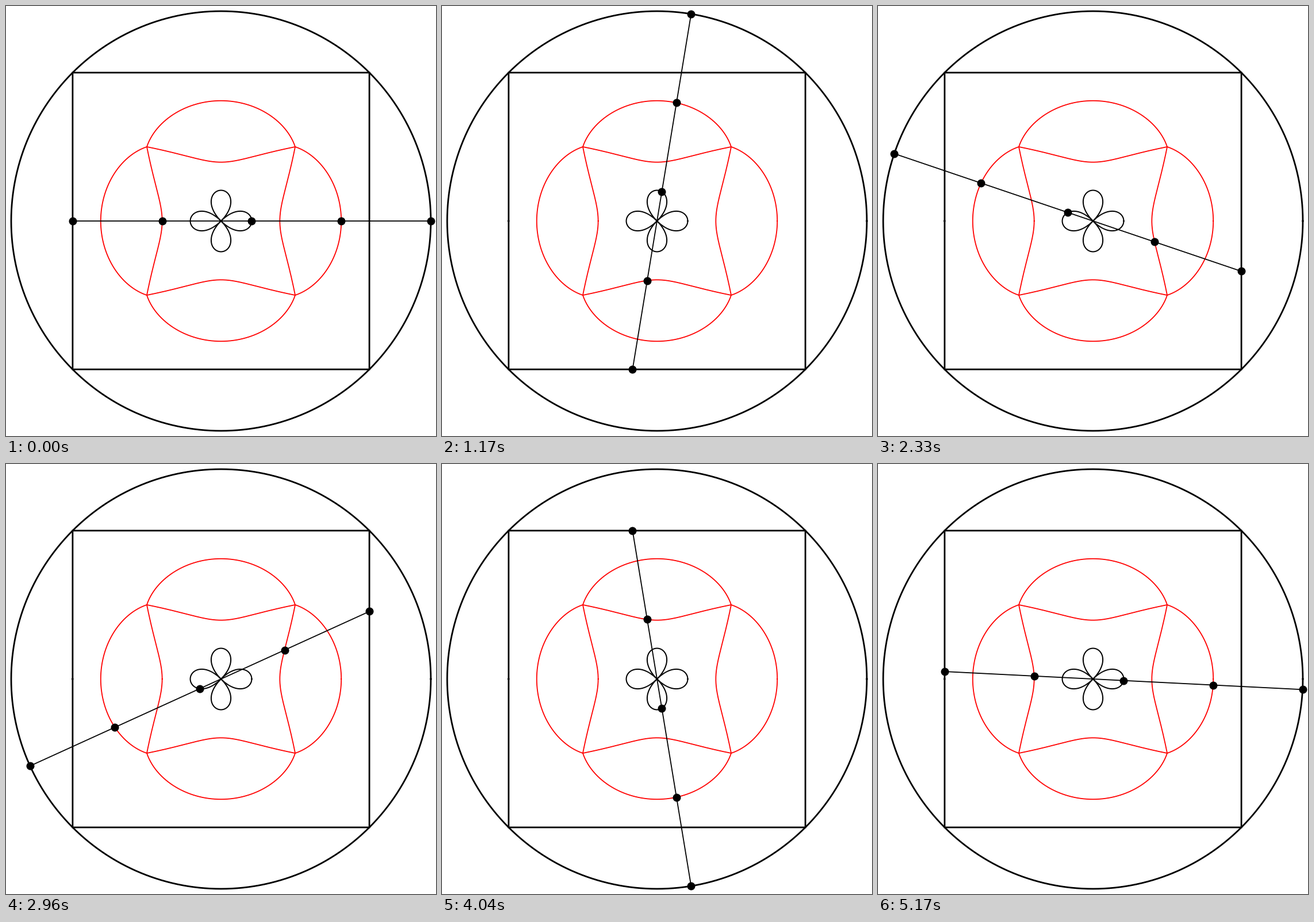
Animation, 748 px wide and 748 px high, one loop 5210 ms. Source, as a matplotlib script:

```python
import numpy as np
import matplotlib.pyplot as plt
from matplotlib.animation import FuncAnimation

SIZE, DPI = 748, 100
PX = 72 / DPI             # one pixel in points
R = 365                   # outer circle
HALF = R / np.sqrt(2)     # half side of the inscribed square
TICKS, TICK_MS = 521, 10
STEPS = 125               # poses per turn
FRACTIONS = np.linspace(0, 1, 5)


def along(angle, f):
    """Point at fraction f of the rod from the circle to the opposite square side."""
    c, s = np.cos(angle), np.sin(angle)
    reach = HALF / np.maximum(abs(c), abs(s))
    r = R - f * (R + reach)
    return r * c, r * s


fig = plt.figure(figsize=(SIZE / DPI, SIZE / DPI), dpi=DPI, facecolor="white")
ax = fig.add_axes([0, 0, 1, 1])
ax.axis("off")

# Locus of each marked point on the rod
theta = np.linspace(0, 2 * np.pi, 721)
styles = [("black", 2.8), ("red", 1.8), ("black", 2), ("red", 1.8), ("black", 2.8)]
for f, (color, width) in zip(FRACTIONS, styles):
    ax.plot(*along(theta, f), color=color, lw=width * PX,
            solid_joinstyle="miter", snap=False)

rod, = ax.plot([], [], color="black", lw=1.8 * PX, snap=False, zorder=3)
dots = ax.scatter(np.zeros(5), np.zeros(5), s=(14 * PX) ** 2, color="black",
                  linewidths=0, zorder=4)
ax.set(xlim=(-SIZE / 2, SIZE / 2), ylim=(-SIZE / 2, SIZE / 2))


def update(tick):
    step = int((tick + 0.5) * STEPS / TICKS)
    x, y = along(2 * np.pi * step / STEPS, FRACTIONS)
    rod.set_data(x, y)
    dots.set_offsets(np.column_stack([x, y]))
    return rod, dots


anim = FuncAnimation(fig, update, frames=TICKS, interval=TICK_MS,
                     repeat=True, repeat_delay=0, blit=False)
plt.show()
```
